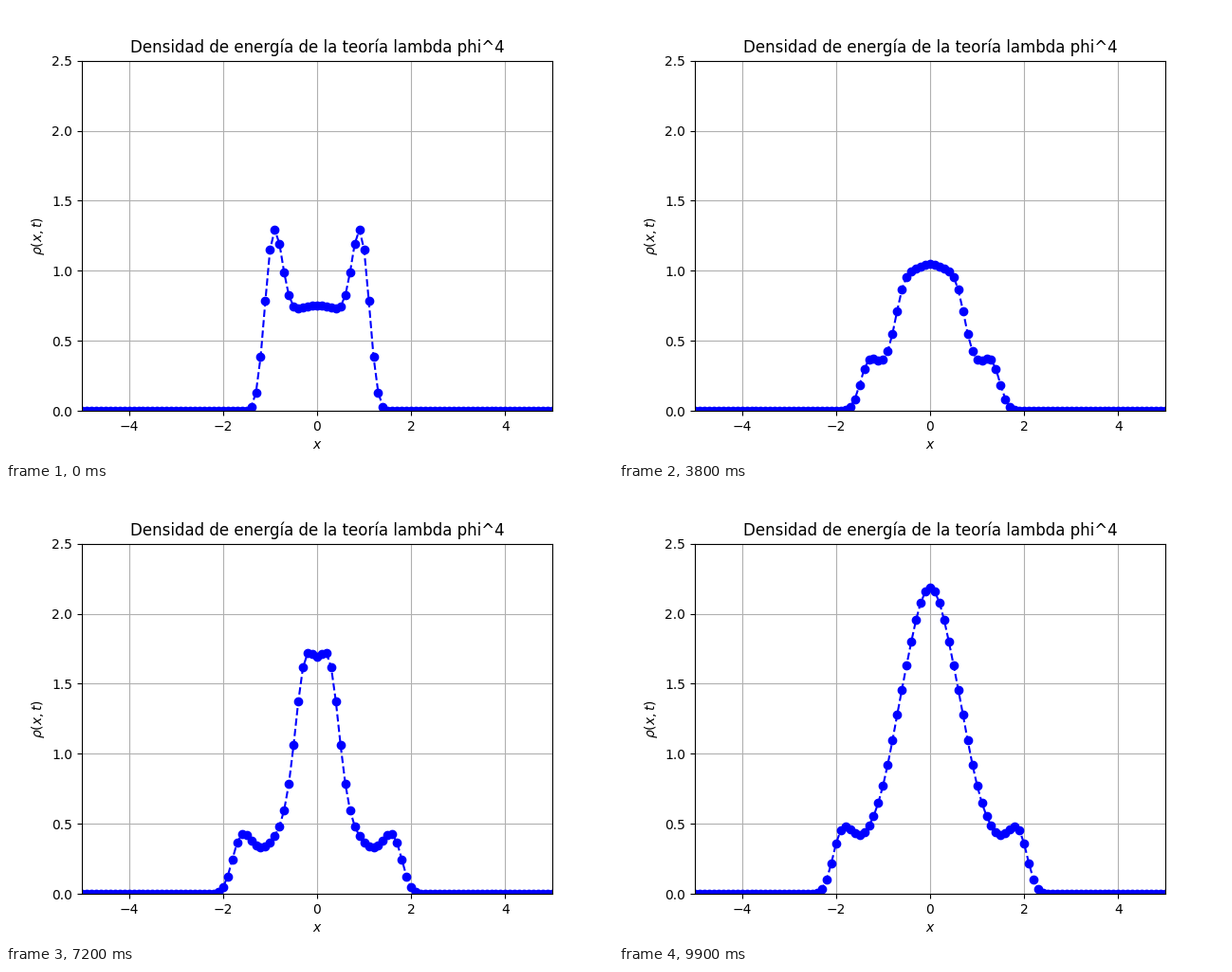
A matplotlib script for the animation above (10 s loop, 640 by 480 pixels).

```python
import numpy as np
import matplotlib.pyplot as plt
from matplotlib.animation import FuncAnimation

FRAMES = 100
x = np.linspace(-5, 5, 101)
h = x[1] - x[0]
dt = 1 / (FRAMES - 1)


def accel(phi):
    lap = (np.roll(phi, -1) - 2 * phi + np.roll(phi, 1)) / h**2
    return lap + phi + phi**3


def slope(phi):
    """Fourth-order centred derivative."""
    near = np.roll(phi, -1) - np.roll(phi, 1)
    far = np.roll(phi, -2) - np.roll(phi, 2)
    return (8 * near - far) / (12 * h)


def density(phi):
    return slope(phi)**2 / 2 + phi**2 / 2 + phi**4 / 4


def evolve():
    """Velocity-Verlet evolution of a flat-topped pulse at rest."""
    phi = np.exp(-x**4)
    vel = np.zeros_like(x)
    rows = []
    for _ in range(FRAMES):
        rows.append(density(phi))
        vel += accel(phi) * dt / 2
        phi = phi + vel * dt
        vel += accel(phi) * dt / 2
    return rows


rho = evolve()

fig, ax = plt.subplots(figsize=(6.4, 4.8), dpi=100)
line, = ax.plot(x, rho[0], "bo--")
ax.set_xlim(-5, 5)
ax.set_ylim(0, 2.5)
ax.set_title("Densidad de energía de la teoría lambda phi^4")
ax.set_xlabel("$x$")
ax.set_ylabel(r"$\rho(x,t)$")
ax.grid(True)


def update(i):
    line.set_ydata(rho[i])
    return line,


anim = FuncAnimation(fig, update, frames=FRAMES, interval=100, repeat=True)
plt.show()
```
